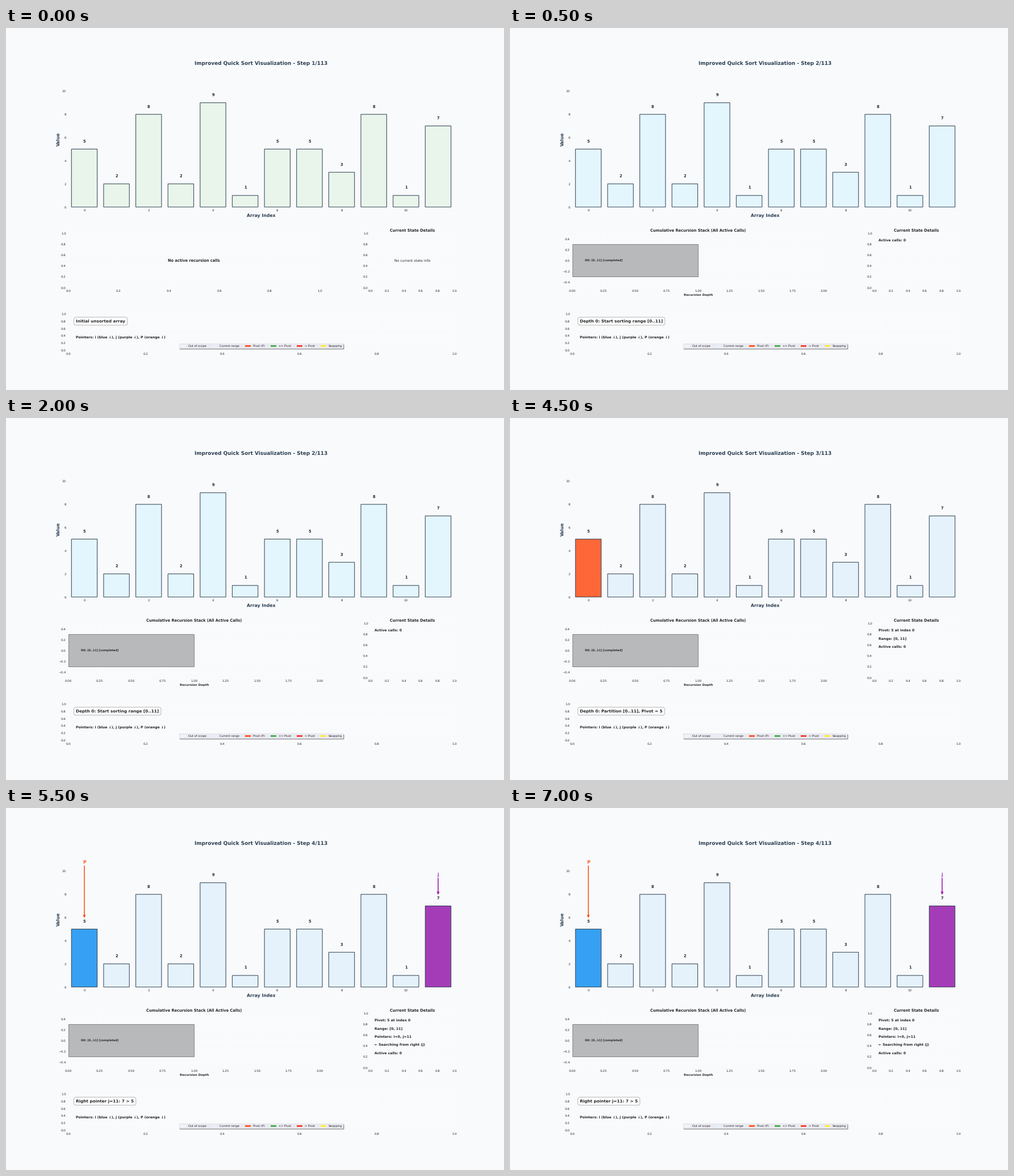
These frames come from a looping animation (877x638 px, 8000 ms). A matplotlib script:

```python
import matplotlib.pyplot as plt
import numpy as np
from matplotlib.animation import FuncAnimation
from matplotlib.patches import Patch

BG, INK, LINE = "#F8FAFC", "0.15", "#2C3E50"
ORANGE, BLUE, PURPLE = "#FF5722", "#2196F3", "#9C27B0"
VALUES = [5, 2, 8, 2, 9, 1, 5, 5, 3, 8, 1, 7]

plt.rcParams.update({
    "font.family": "DejaVu Sans", "font.size": 10, "text.hinting": "none",
    "figure.facecolor": BG, "axes.facecolor": BG,
    "axes.edgecolor": "white", "axes.linewidth": 0,
    "axes.grid": True, "axes.axisbelow": True,
    "grid.color": "white", "grid.linewidth": 1,
    "text.color": INK, "axes.labelcolor": INK,
    "xtick.color": INK, "ytick.color": INK,
    "xtick.labelsize": 10, "ytick.labelsize": 10,
    "xtick.major.size": 0, "ytick.major.size": 0,
    "xtick.major.pad": 7, "ytick.major.pad": 7,
    "patch.linewidth": 0.3,
})

# Each step: length in ticks, base fill, highlighted bars, message, details
STEPS = [
    dict(ticks=1, fill="#E8F5E9", marked={}, message="Initial unsorted array",
         details=None, pointers=[]),
    dict(ticks=5, fill="#E1F5FE", marked={},
         message="Depth 0: Start sorting range [0..11]",
         details=["Active calls: 0"], pointers=[]),
    dict(ticks=5, fill="#E3F2FD", marked={0: ORANGE},
         message="Depth 0: Partition [0..11], Pivot = 5",
         details=["Pivot: 5 at index 0", "Range: [0, 11]", "Active calls: 0"],
         pointers=[]),
    dict(ticks=5, fill="#E3F2FD", marked={0: BLUE, 11: PURPLE},
         message="Right pointer j=11: 7 > 5",
         details=["Pivot: 5 at index 0", "Range: [0, 11]",
                  "Pointers: i=0, j=11", "← Searching from right (j)",
                  "Active calls: 0"],
         pointers=[("P", 0, 10.55, ORANGE), ("j", 11, 9.5, PURPLE)]),
]
TIMELINE = [n for n, step in enumerate(STEPS) for _ in range(step["ticks"])]

LEGEND = [("Out of scope", "#F5F5F5"), ("Current range", "#E3F2FD"),
          ("Pivot (P)", ORANGE), ("<= Pivot", "#4CAF50"),
          ("> Pivot", "#F44336"), ("Swapping", "#FFEB3B")]

fig = plt.figure(figsize=(21.993731, 16), dpi=39.875)
grid = fig.add_gridspec(3, 2, height_ratios=[3, 1.2, 0.8],
                        width_ratios=[3, 1], hspace=0.35, wspace=0.3)
ax_bars = fig.add_subplot(grid[0, :])
ax_stack = fig.add_subplot(grid[1, 0])
ax_state = fig.add_subplot(grid[1, 1])
ax_info = fig.add_subplot(grid[2, :])


def unit_axes(ax):
    ax.clear()
    ax.set(xlim=(0, 1), ylim=(0, 1),
           xticks=np.arange(6) / 5, yticks=np.arange(6) / 5)


def bold(ax, x, y, text, size, **kw):
    return ax.text(x, y, text, fontsize=size, fontweight="bold", **kw)


def draw_bars(step, number):
    ax = ax_bars
    ax.clear()
    ax.grid(False)
    colors = [step["marked"].get(i, step["fill"]) for i in range(len(VALUES))]
    ax.bar(range(len(VALUES)), VALUES, width=0.8, color=colors,
           edgecolor=LINE, linewidth=2, alpha=0.9, snap=False)
    for i, v in enumerate(VALUES):
        bold(ax, i, v + 0.5, str(v), 12, ha="center", va="bottom")
    for name, i, y, color in step["pointers"]:
        ax.annotate(name, xy=(i, VALUES[i] + 0.9), xytext=(i, y),
                    ha="center", va="bottom", fontsize=14,
                    fontweight="bold", color=color,
                    arrowprops=dict(arrowstyle="-|>", color=color, lw=3))
    ax.set(xlim=(-0.5, 11.5), ylim=(0, 11.7),
           xticks=range(0, 11, 2), yticks=range(0, 11, 2))
    label = dict(fontsize=14, fontweight="bold", color=LINE)
    ax.set_xlabel("Array Index", **label)
    ax.set_ylabel("Value", **label)
    ax.set_title(f"Improved Quick Sort Visualization - Step {number}/113",
                 fontsize=16, fontweight="bold", color=LINE, pad=20)


def draw_stack(active):
    ax = ax_stack
    unit_axes(ax)
    if not active:
        bold(ax, 0.5, 0.5, "No active recursion calls", 12,
             ha="center", va="center")
        return
    ax.barh(0, 1, height=0.6, color="#9E9E9E", edgecolor="black",
            linewidth=1, alpha=0.7)
    bold(ax, 0.1, 0, "D0: [0..11] [completed]", 9, va="center")
    ax.set(xlim=(0, 2), ylim=(-0.5, 0.5), xticks=np.arange(9) / 4,
           yticks=np.arange(-2, 3) / 5)
    ax.set_xlabel("Recursion Depth", fontsize=10, fontweight="bold")
    ax.set_title("Cumulative Recursion Stack (All Active Calls)",
                 fontsize=12, fontweight="bold")


def draw_state(details):
    ax = ax_state
    unit_axes(ax)
    ax.set_title("Current State Details", fontsize=12, fontweight="bold")
    if details is None:
        ax.text(0.5, 0.5, "No current state info", fontsize=11,
                ha="center", va="center")
        return
    for row, line in enumerate(details):
        bold(ax, 0.05, 0.9 - 0.15 * row, line, 11, va="top")


def draw_info(message):
    ax = ax_info
    unit_axes(ax)
    bold(ax, 0.02, 0.8, message, 13, va="center",
         bbox=dict(boxstyle="round,pad=0.5", facecolor="white",
                   edgecolor="gray", linewidth=1))
    bold(ax, 0.02, 0.35, "Pointers: i (blue ↓), j (purple ↓), P (orange ↓)",
         11, va="center")
    ax.legend(handles=[Patch(facecolor=c, label=t) for t, c in LEGEND],
              loc="lower center", ncol=6, fontsize=9, frameon=True,
              shadow=True, facecolor="#EAEAF2")


def draw(frame):
    n = TIMELINE[frame]
    step = STEPS[n]
    draw_bars(step, n + 1)
    draw_stack(step["details"] is not None)
    draw_state(step["details"])
    draw_info(step["message"])
    return []


anim = FuncAnimation(fig, draw, frames=len(TIMELINE), interval=500,
                     init_func=lambda: draw(0), repeat=True, repeat_delay=0)
plt.show()
```
